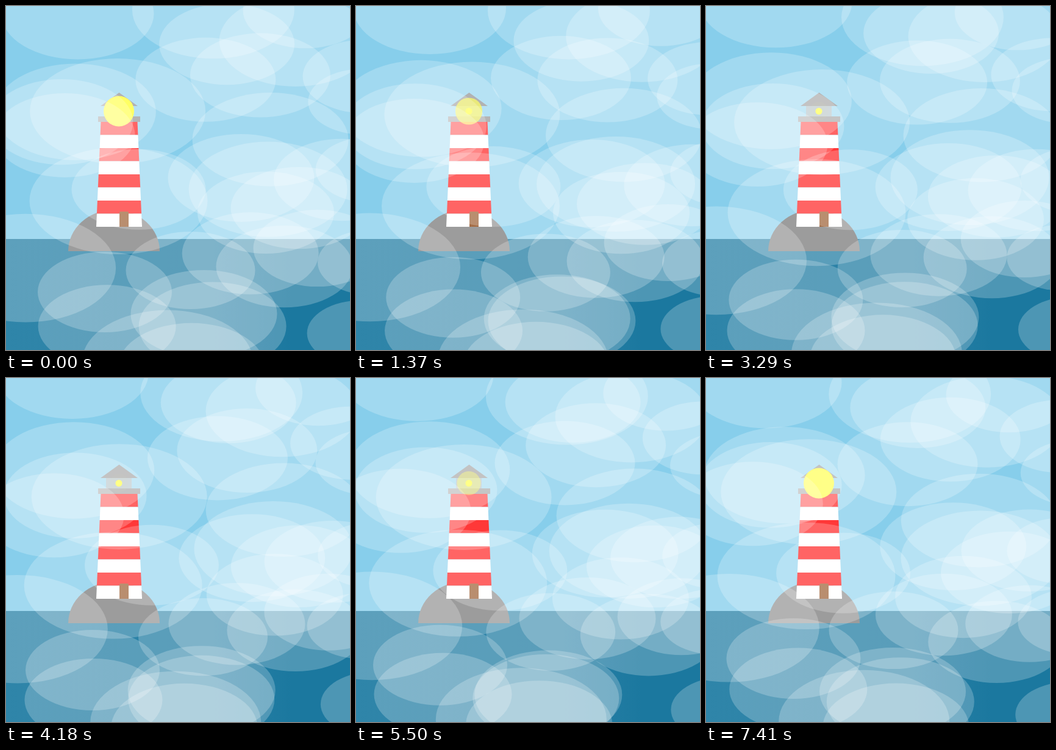
Write an HTML page with a canvas that moves like this. It is 564x564 px and loops after 7.49 s.

```html
<!DOCTYPE html>
<html lang="en">
<head>
<meta charset="utf-8">
<title>Lighthouse in the fog</title>
<style>
  html, body { margin: 0; width: 100%; height: 100%; overflow: hidden; background: #87ceeb; }
  canvas { display: block; width: 564px; height: 564px; }
</style>
</head>
<body>
<canvas id="stage" width="564" height="564"></canvas>
<script>
const ctx = document.getElementById('stage').getContext('2d');
const SIZE = 564, HORIZON = 382;
const LOOP = 7490, STEP = LOOP / 94;
const TURN = 33;                 // degrees per second
const ORBIT = 12, FLATNESS = 0.6, FOG = 'rgba(255,255,255,0.22)';
const RAD = Math.PI / 180;

const puffs = [];
const addPuff = (x, y, radius, start, turn) => puffs.push({ x, y, radius, start, turn });

// Main puffs, as x, y, radius; each starts 30 degrees further round than the last
function addRing(start, turn, ...spots) {
  spots.forEach(([x, y, radius], i) => addPuff(x, y, radius, start + 30 * i, turn));
}

// Evenly spaced puffs of one size
function addRow(x, y, dx, dy, count, radius) {
  for (let i = 0; i < count; i++) {
    addPuff(x + i * dx, y + i * dy, radius, 137.5 * puffs.length, TURN);
  }
}

addRing(-75, TURN,
  [180, 184, 144], [176, 328, 146], [85, 215, 115], [154, 522, 113],
  [578, 107, 100], [29, 418, 148], [117, 162, 132], [438, 292, 130],
  [522, 394, 105], [445, 222, 128], [500, 16, 103], [343, 18, 133]);
addRing(-15, -TURN,
  [463, 60, 125], [327, 522, 121], [109, 4, 125], [359, 51, 111],
  [268, 571, 140], [311, 425, 106], [103, 187, 117], [397, 285, 120]);
addRow(335, 130, 70, -18, 2, 115);
addRow(595, 150, 0, 130, 4, 90);
addRow(540, 290, -55, 30, 3, 112);
addRow(390, 400, 78, 24, 2, 112);
addRow(318, 515, -16, 65, 2, 120);
addRow(227, 308, -77, 162, 2, 110);

function polygon(color, ...points) {
  ctx.fillStyle = color;
  ctx.beginPath();
  points.forEach(([x, y]) => ctx.lineTo(x, y));
  ctx.fill();
}

function oval(color, x, y, rx, ry = rx, from = 0) {
  ctx.fillStyle = color;
  ctx.beginPath();
  ctx.ellipse(x, y, rx, ry, 0, from, 2 * Math.PI);
  ctx.fill();
}

function rect(color, x, y, w, h) {
  ctx.fillStyle = color;
  ctx.fillRect(x, y, w, h);
}

function drawBackdrop() {
  rect('#87ceeb', 0, 0, SIZE, HORIZON);
  const sea = ctx.createLinearGradient(0, 0, SIZE, 0);
  sea.addColorStop(0, '#2f85a9');
  sea.addColorStop(0.6, '#2a81a6');
  sea.addColorStop(0.83, '#1b789f');
  rect(sea, 0, HORIZON, SIZE, SIZE - HORIZON);
}

function drawTower() {
  oval('#808080', 177, 402, 75, 68, Math.PI);
  const top = 190, bottom = 362, band = (bottom - top) / 8;
  const flare = y => (y - top) / (bottom - top) * 7.5;
  for (let i = 0; i < 8; i++) {
    const y = top + i * band, end = y + band;
    polygon(i % 2 ? '#fff' : '#f00',
      [155.5 - flare(y), y], [215.5 + flare(y), y],
      [215.5 + flare(end), end], [155.5 - flare(end), end]);
  }
  ctx.fillStyle = '#8b4513';
  ctx.beginPath();
  ctx.roundRect(186, 337, 15, 25, [2, 2, 0, 0]);
  ctx.fill();
  rect('#a0b0b8', 164, 163, 42, 19);
  rect('#858585', 151, 181, 69, 9);
  polygon('#808080', [155, 164], [185.5, 142], [216, 164]);
}

function drawLight(time) {
  const glow = (1 + Math.cos(2 * Math.PI * time / LOOP)) / 2;
  oval(`rgba(255,255,0,${glow})`, 185, 172.5, 15 + 10 * glow);
  oval('#ff0', 185, 172.5, 5.5);
}

function drawFog(time) {
  for (const { x, y, radius, start, turn } of puffs) {
    const angle = (start + turn * time / 1000) * RAD;
    oval(FOG, x + ORBIT * Math.cos(angle), y + ORBIT * Math.sin(angle),
      radius, radius * FLATNESS);
  }
}

function draw(time) {
  drawBackdrop();
  drawTower();
  drawLight(time);
  drawFog(time);
}

let begin = null;
function tick(now) {
  begin ??= now;
  const time = Math.max(0, now - begin) % LOOP;
  draw(Math.floor(time / STEP) * STEP);
  requestAnimationFrame(tick);
}
draw(0);
requestAnimationFrame(tick);
</script>
</body>
</html>
```
